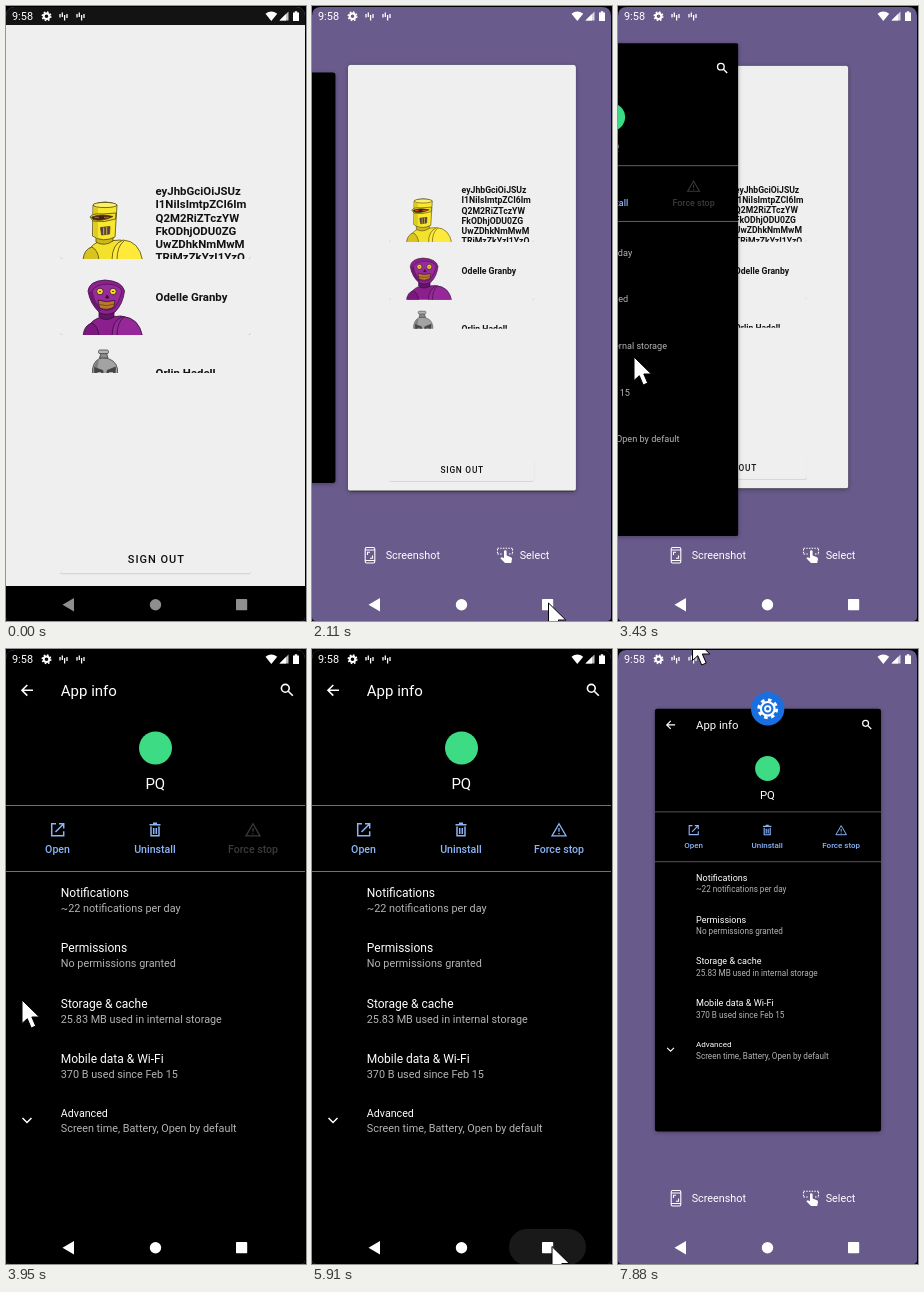
These frames come from a looping animation (300x615 px, 8 s). An HTML page:

```html
<!DOCTYPE html>
<html lang="en">
<head>
<meta charset="utf-8">
<title>Recent apps</title>
<style>
html, body { margin: 0; width: 100%; height: 100%; overflow: hidden; background: #000; }
svg { display: block; width: 300px; height: 615px; font-family: Roboto, sans-serif; }
.line { fill: none; stroke: currentColor; }
.card { filter: drop-shadow(0 1px 2px rgba(0, 0, 0, .3)); }
</style>
</head>
<body>
<svg viewBox="0 0 300 615">
  <defs>
    <clipPath id="screen"><path d="M0 10Q0 1 9 1H290Q299 1 299 10V611Q299 615 295 615H4Q0 615 0 611Z"/></clipPath>
    <clipPath id="appClip"><rect width="300" height="615"/></clipPath>
    <clipPath id="infoClip"><rect width="300" height="615"/></clipPath>
    <clipPath id="row1"><rect x="54" y="177" width="191" height="76"/></clipPath>
    <clipPath id="row2"><rect x="54" y="254" width="191" height="75"/></clipPath>
    <clipPath id="row3"><rect x="54" y="330" width="191" height="37"/></clipPath>
  </defs>
  <g clip-path="url(#screen)">
    <rect id="wall" width="300" height="615"/>
    <g id="actions" color="#fff" fill="#fff" font-size="10.8">
      <g class="line" stroke-width="1.1">
        <rect x="53.2" y="541.5" width="9.6" height="15.5" rx="1.4"/>
        <path d="M53 544H63M53 554.5H63M55.5 549V546.3H58M60.5 549.5V552.2H58"/>
        <path d="M185.5 542.3H200.5M185.5 548H190M197 548H200.5" stroke-dasharray="1.5 1.2"/>
        <path d="M185.5 543V548M200.5 543V548" stroke-dasharray="1.5 1.2"/>
      </g>
      <path d="M192 545.5a1.3 1.3 0 0 1 2.6 0V549.5L199 551.3Q200.3 552 200 553.2L199.2 557H193L188.3 552.3L189.5 551.2L192 552Z"/>
      <text x="73.7" y="553">Screenshot</text>
      <text x="207.7" y="553">Select</text>
    </g>

    <g id="app" class="card"><g id="appBody"><g clip-path="url(#appClip)">
      <rect width="300" height="615"/>
      <rect width="300" height="19" fill="#131313"/>
      <rect y="19" width="300" height="561" fill="#efefef"/>
      <g fill="none" stroke="#d2d2d2" stroke-width=".9">
        <path d="M54.5 251q0 1.8 2 1.8M244.5 251q0 1.8 -2 1.8M54.5 327q0 1.8 2 1.8M244.5 327q0 1.8 -2 1.8"/>
      </g>
      <g clip-path="url(#row1)" stroke="#4f4810" stroke-width=".8">
        <path d="M79 254Q82 240 92 236L114 234Q130 236 134 254Z" fill="#f3e12c"/>
        <path d="M106 254Q106 238 117 234Q133 235 136.500 254Z" fill="#ffe93a"/>
        <path d="M111 254Q111 240 118 235" fill="none"/>
        <path d="M77 254Q78 243 86 241Q92 244 93 254Z" fill="#d8c320"/>
        <path d="M90 230V236Q98 241 107 235V229Z" fill="#cdb71b"/>
        <path d="M87 199L86.500 230Q97 237 109 231L111 199Q99 193 87 199Z" fill="#f9e72f"/>
        <path d="M87.500 201V229Q90 232 92 232.500V202Z" fill="#dfca22" stroke="none"/>
        <ellipse cx="99" cy="199" rx="12" ry="2.600" fill="#fff06a"/>
        <path d="M84 211Q86 207 97 208L110 207L109.500 213Q98 217 87 215Z" fill="#f3df2a"/>
        <path d="M85.500 211Q95 207.500 107 210.500Q96 216 87 213.500Z" fill="#3b2412"/>
        <path d="M88.500 211.500H93M98 211.500H103" stroke="#d8452a" stroke-width="1.600"/>
        <path d="M94.500 221.500L104 220.500L103.500 228L95.500 229Z" fill="#5a3b55"/>
        <path d="M97.700 221.500V228.500M100.700 221V228.500" stroke="#f0d83a"/>
      </g>
      <g clip-path="url(#row2)" stroke="#35103a" stroke-width=".8">
        <path d="M79 330Q82 316 92 312L115 310Q130 312 134 330Z" fill="#8a1f8d"/>
        <path d="M106 330Q106 314 117 310.500Q133 312 136.500 330Z" fill="#96289a"/>
        <path d="M111 330Q111 316 118 311" fill="none"/>
        <path d="M77 330Q78 319 86 317Q92 320 93 330Z" fill="#7a197d"/>
        <path d="M93 305V311Q100 316 108 311V305Z" fill="#64146a"/>
        <path d="M82 285Q83 275 99 274Q116 275 118.500 285Q117 298 109 306Q101 310 94 307Q84 298 82 285Z" fill="#8d2190"/>
        <path d="M86 285Q90 278 102 278Q114 279 116 285Q113 297 107 303Q100 306 95 303Q88 297 86 285Z" fill="#982a9b" stroke-width=".6"/>
        <path d="M82.500 286Q84 298 94 306L95 303Q88 297 86 285Z" fill="#6e1772" stroke="none"/>
        <circle cx="94" cy="285.500" r="3.300" fill="#f2d62b"/>
        <circle cx="107" cy="285.500" r="3.300" fill="#f2d62b"/>
        <path d="M93 285.500H95M106 285.500H108M99.500 292L101 289L103 292Z" fill="#222"/>
        <path d="M92 294Q100 297 109 294.500L108 301Q101 305 93.500 302Z" fill="#b9792a"/>
        <path d="M93 298.500Q101 301 108.500 298" fill="none" stroke="#70401a"/>
      </g>
      <g clip-path="url(#row3)" stroke="#444" stroke-width=".8">
        <path d="M86.500 372V363Q88 353 97 351.500Q110 353 111.500 363V372Z" fill="#a3a3a3"/>
        <path d="M87.500 372V363Q88.500 356 93 353.500Q91 362 91 372Z" fill="#7f7f7f" stroke="none"/>
        <path d="M95 347H100.500L102 352H93.500Z" fill="#8b8b8b"/>
        <rect x="92.500" y="344" width="10" height="3.600" rx="1.500" fill="#b5b5b5"/>
        <path d="M88.500 361.500L97 364.500V368H89ZM109.500 361L101 364.500V368H109Z" fill="#444"/>
        <path d="M91.500 366.500H95M103 366.500H107" stroke="#d6c8c4"/>
      </g>
      <g id="names" font-size="11.42" font-weight="700" fill="#111"></g>
      <rect x="54" y="539" width="191" height="29.300" rx="2.500" fill="#cfcfcf"/>
      <rect x="54" y="538" width="191" height="29.200" rx="2.500" fill="#efefef"/>
      <text x="121.800" y="556.800" font-size="11" font-weight="500" letter-spacing=".98" fill="#111">SIGN OUT</text>
    </g></g></g>

    <g id="info" class="card"><g id="infoBody"><g clip-path="url(#infoClip)">
      <rect width="300" height="615"/>
      <g id="page" fill="#fff" color="#fff">
        <path class="line" stroke-width="1.6" d="M27 41.300H16M21.300 36L16 41.300L21.300 46.600"/>
        <g class="line" stroke-width="1.6"><circle cx="279.300" cy="39.300" r="3.900"/><path d="M282.300 42.300L286.800 46.800"/></g>
        <text x="54.800" y="46.700" font-size="15">App info</text>
        <circle cx="149.500" cy="99" r="16.500" fill="#3ddc84"/>
        <text x="149.300" y="139.500" font-size="15" text-anchor="middle">PQ</text>
        <path d="M0 156.500H300M0 222.500H300" stroke="#727272"/>
        <g color="#8ab4f8">
          <path class="line" stroke-width="1.500" d="M50 174.700H45.700V186.700H57.700V182.300M53 174.700H57.700V179.500M57.200 175.200L49.500 183"/>
          <path class="line" stroke-width="1.500" d="M143.500 175.800H154.500M147 174.300H151M145 177.500V186.800H153V177.500M147.700 179V185M150.300 179V185"/>
        </g>
        <g id="stop">
          <path class="line" stroke-width="1.300" d="M240 186.800L247 174.700L254 186.800ZM247 179V182.700M247 184V185.300"/>
          <text x="247" y="203.800" font-size="10.6" font-weight="500" text-anchor="middle" fill="currentColor">Force stop</text>
        </g>
        <path class="line" stroke="#bbb" stroke-width="1.500" d="M16.500 469L21 473.500L25.500 469"/>
      </g>
    </g></g></g>

    <g id="badge">
      <circle cx="149.700" cy="59.800" r="16.700" fill="#1a6fe0"/>
      <g fill="none" stroke="#fff">
        <circle cx="149.700" cy="59.800" r="6.800" stroke-width="2.200"/>
        <circle cx="149.700" cy="59.800" r="9" stroke-width="2.800" stroke-dasharray="3.534"/>
        <circle cx="149.700" cy="59.800" r="2.700" stroke-width="1.800"/>
      </g>
    </g>

    <rect id="ripple" x="197" y="580" width="77" height="36" rx="18" fill="#fff"/>
    <g id="nav">
      <path d="M56.500 598.700L68 592V605.400Z"/>
      <circle cx="149.500" cy="598.800" r="5.700"/>
      <rect x="230" y="593" width="11.200" height="11.200" rx=".8"/>
    </g>

    <g fill="#fff">
      <text x="6" y="14" font-size="10.9">9:58</text>
      <g fill="none" stroke="#fff">
        <circle cx="40.500" cy="10.300" r="2.800" stroke-width="2"/>
        <circle cx="40.500" cy="10.300" r="4.200" stroke-width="1.600" stroke-dasharray="1.649"/>
        <path stroke-width="1.300" d="M54 8V11.500M56.300 6.500V11M58.600 9V14.500M61 8V12"/>
        <path stroke-width="1.300" d="M71 8V11.500M73.300 6.500V11M75.600 9V14.500M78 8V12"/>
      </g>
      <path d="M259.500 7.800Q265.300 3.300 271.200 7.800L265.300 15Z"/>
      <path d="M273.500 14.500L282.500 5.500V14.500Z" fill-opacity=".75"/>
      <path d="M273.500 14.500L280 8V14.500Z"/>
      <path d="M287 6.500H288.800V5.300H291.200V6.500H293V15H287Z"/>
    </g>
    <path id="cursor" d="M0 0V23.500L5.300 18.700L9.200 28L13.700 26L9.800 17H17.300Z" fill="#fff" stroke="#000" stroke-width="1"/>
  </g>
</svg>
<script>
const $ = id => document.getElementById(id);
const LOOP = 8000, SMALL = 0.755, SIDE = 0.733;

const clamp = v => Math.max(0, Math.min(1, v));
const ramp = (t, a, b) => clamp((t - a) / (b - a));
const easeOut = v => 1 - (1 - v) ** 2;
const mix = (a, b, k) => a + (b - a) * k;
const show = (id, alpha) => $(id).setAttribute('opacity', alpha);
const label = (x, y, s, extra = '') => `<text x="${x}" y="${y}" ${extra}>${s}</text>`;

const token = ['eyJhbGciOiJSUz', 'I1NiIsImtpZCI6Im', 'Q2M2RiZTczYW', 'FkODhjODU0ZG', 'UwZDhkNmMwM', 'TRiMzZkYzI1YzQ'];
$('names').innerHTML =
  '<g clip-path="url(#row1)">' + token.map((s, i) => label(149.5, 188.9 + i * 13.3, s)).join('') + '</g>' +
  label(149.5, 295.4, 'Odelle Granby') +
  '<g clip-path="url(#row3)">' + label(149.5, 371, 'Orlin Hadell') + '</g>';

const rows = [
  ['Notifications', '~22 notifications per day'],
  ['Permissions', 'No permissions granted'],
  ['Storage &amp; cache', '25.83 MB used in internal storage'],
  ['Mobile data &amp; Wi-Fi', '370 B used since Feb 15'],
  ['Advanced', 'Screen time, Battery, Open by default']
];
const blue = 'font-size="10.6" font-weight="500" fill="#8ab4f8" text-anchor="middle"';
$('page').insertAdjacentHTML('beforeend',
  label(51.5, 203.8, 'Open', blue) + label(149, 203.8, 'Uninstall', blue) +
  rows.map(([head, sub], i) => {
    const y = 247.8 + i * 55.4 - (i === 4 ? 1.2 : 0);
    return label(54.8, y, head, `font-size="${i === 4 ? 10.7 : 12}"`) +
      label(54.8, y + 15, sub, 'font-size="10.82" fill="#b4b4b4"');
  }).join(''));

// time, x, y of the pointer tip
const path = [
  [0, 236.5, 640], [200, 236.5, 615], [520, 236.5, 597], [2320, 236.5, 597], [2500, 105, 399.5],
  [3040, 16, 351], [4000, 16, 351], [4430, 55, 275], [4890, 103, 361], [5230, 203, 540],
  [5480, 240, 597.5], [7150, 240, 597.5], [7550, 143, 135], [7880, 74.5, -12], [LOOP, 74.5, -12]
];

function pointer(t) {
  const i = path.findIndex(k => k[0] > t);
  const [t0, x0, y0] = path[i - 1], [t1, x1, y1] = path[i];
  let k = ramp(t, t0, t1);
  if (t1 === 3040) k = easeOut(k);
  $('cursor').setAttribute('transform', `translate(${mix(x0, x1, k)} ${mix(y0, y1, k)})`);
}

// shrink: 0 is full screen, 1 is a card without the system bars
function place(id, x, y, scale, shrink) {
  $(id + 'Body').setAttribute('transform', `translate(${x} ${y}) scale(${scale})`);
  const r = $(id + 'Clip').firstElementChild;
  r.setAttribute('y', 20 * shrink);
  r.setAttribute('height', 615 - 55 * shrink);
  r.setAttribute('rx', 4 * shrink);
}

function centre(id, p, shift = 0) {
  const s = mix(1, SMALL, p);
  place(id, 149.8 * (1 - s) + shift, 44.7 * p, s, p);
}

function launch(q, slide) {
  place('info', -195 * (1 - q) ** 0.7 - slide, 51.85 * (1 - q) ** 1.17, mix(SIDE, 1, q), 1 - q);
}

function draw(t) {
  const first = easeOut(ramp(t, 1880, 2150));
  const second = easeOut(ramp(t, 6710, 7220));
  const q = t < 3600 ? 0.42 * ramp(t, 3250, 3430) : mix(0.42, 1, easeOut(ramp(t, 3580, 3950)));
  const late = t >= 3950;

  const p = late ? second : first;
  const glow = Math.min(2, (1 - p) / 0.26);
  $('wall').setAttribute('fill', `rgb(${104 + 22 * glow},${90 + 18 * glow},${139 + 20 * glow})`);
  show('actions', clamp((p - 0.4) / 0.45));

  show('app', late ? 0 : 1);
  centre('app', first, -78 * q);
  show('info', t < 1880 ? 0 : 1);
  if (late) centre('info', second);
  else launch(q, 60 * (1 - first));
  show('page', t < 2700 ? 0 : 1);
  $('stop').setAttribute('color', t < 5300 ? '#3a3a3a' : '#8ab4f8');
  show('badge', ramp(t, 7220, 7400));

  const lit = ramp(t, 720, 900) - ramp(t, 4200, 4400) + ramp(t, 5740, 5900);
  const c = mix(142, 255, lit);
  $('nav').setAttribute('fill', `rgb(${c},${c},${c})`);
  const press = t < 1400 ? ramp(t, 720, 1000) : ramp(t, 5740, 6020) * (1 - ramp(t, 6080, 6160));
  show('ripple', 0.16 * press);
  pointer(t);
}

const start = performance.now();
function tick() {
  draw((performance.now() - start) % LOOP);
  requestAnimationFrame(tick);
}
tick();
</script>
</body>
</html>
```
